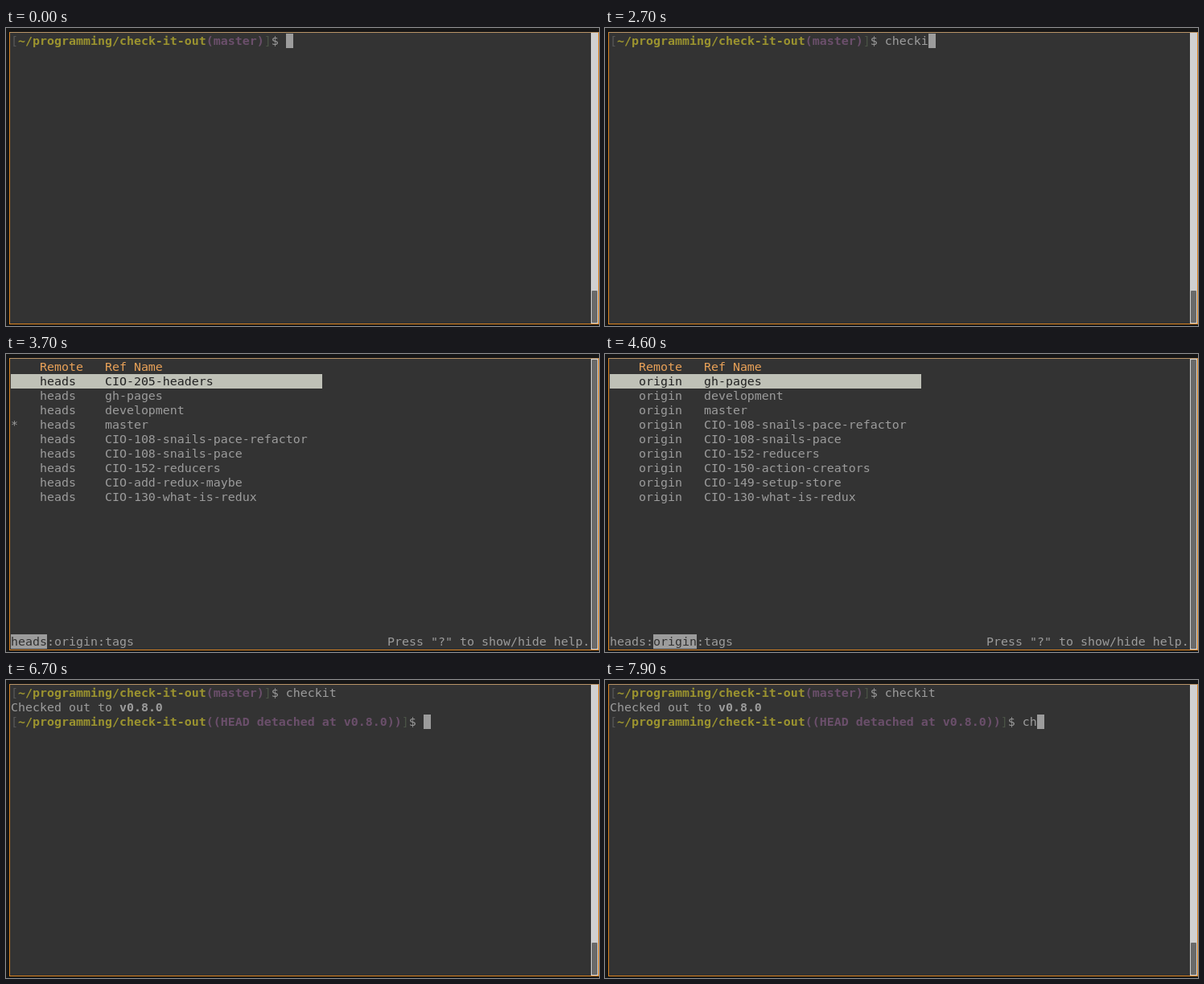
Write an HTML page that moves like this. It is 737 px wide and 371 px high and loops after 8 s.

```html
<!DOCTYPE html>
<html lang="en">
<head>
<meta charset="utf-8">
<title>Terminal: checkit</title>
<style>
  html, body { margin: 0; width: 100%; height: 100%; overflow: hidden; background: #161616; }
  #stage { position: relative; width: 737px; height: 371px; overflow: hidden; }
  #stage * { box-sizing: border-box; }
  #window {
    position: absolute; left: 4px; top: 5px; width: 733px; height: 364px;
    background: #333; border: 1px solid #de8420; border-top-color: #b89468;
  }
  #bar { position: absolute; left: 727px; top: 6px; width: 9px; height: 362px; background: #d0d0d0; }
  #thumb {
    position: absolute; left: 0; bottom: 0; width: 9px; height: 42px;
    background: #696969; border: 1px solid #d0d0d0; border-radius: 2px;
    animation: thumb 8s step-end infinite;
  }
  #term {
    position: absolute; left: 6px; top: 7px; width: 720px; height: 360px;
    font: 14.95px/18px "DejaVu Sans Mono", monospace; color: #9c9c9c;
  }
  pre, .view { position: absolute; left: 0; top: 0; margin: 0; font: inherit; white-space: pre; }
  .view { width: 720px; height: 360px; }
  b { font-weight: bold; }
  .path { color: #9b932f; }
  .branch { color: #6b4f6b; }
  .open { color: #575757; }
  .close { color: #4b5446; }
  .typed { display: inline-block; height: 18px; vertical-align: top; overflow: hidden; width: 0; }
  .head { color: #e8a158; }
  .pick { display: inline-block; height: 18px; vertical-align: top; background: #bfc1b7; color: #222; }
  .status { top: 342px; }
  .tab { display: inline-block; height: 18px; vertical-align: top; background: #9c9c9c; color: #303030; }
  .help { top: 342px; left: 468px; }
  #cursor {
    position: absolute; width: 9px; height: 18px; background: #9c9c9c;
    animation: cursor 8s step-end infinite;
  }
  #first { animation: first 8s step-end infinite; }
  #after { top: 18px; animation: after 8s step-end infinite; }
  #cmd { animation: cmd 8s step-end infinite; }
  #next { animation: next 8s step-end infinite; }
  #heads { animation: heads 8s step-end infinite; }
  #origin { animation: origin 8s step-end infinite; }
  #tags { animation: tags 8s step-end infinite; }

  @keyframes thumb { 0%, 83.75%, 100% { height: 42px; } 45% { height: 362px; } }
  @keyframes first { 0%, 83.75%, 100% { visibility: visible; } 45% { visibility: hidden; } }
  @keyframes after { 0% { visibility: hidden; } 83.75%, 100% { visibility: visible; } }
  @keyframes heads { 0%, 57.5%, 100% { visibility: hidden; } 46.25% { visibility: visible; } }
  @keyframes origin { 0%, 68.75%, 100% { visibility: hidden; } 57.5% { visibility: visible; } }
  @keyframes tags { 0%, 83.75%, 100% { visibility: hidden; } 68.75% { visibility: visible; } }
  @keyframes cmd {
    0% { width: 0; } 17.5% { width: 9px; } 21.25% { width: 18px; } 23.75% { width: 27px; }
    27.5% { width: 36px; } 30% { width: 45px; } 33.75% { width: 54px; } 36.25%, 100% { width: 63px; }
  }
  @keyframes next { 0% { width: 0; } 95% { width: 9px; } 98.75%, 100% { width: 18px; } }
  @keyframes cursor {
    0% { transform: translate(342px, 0); visibility: visible; }
    6.25% { transform: translate(342px, 0); visibility: hidden; }
    13.75% { transform: translate(342px, 0); visibility: visible; }
    17.5% { transform: translate(351px, 0); visibility: visible; }
    21.25% { transform: translate(360px, 0); visibility: visible; }
    23.75% { transform: translate(369px, 0); visibility: visible; }
    27.5% { transform: translate(378px, 0); visibility: visible; }
    30% { transform: translate(387px, 0); visibility: visible; }
    33.75% { transform: translate(396px, 0); visibility: visible; }
    36.25% { transform: translate(405px, 0); visibility: visible; }
    43.75% { transform: translate(0, 18px); visibility: visible; }
    45% { transform: translate(0, 0); visibility: hidden; }
    83.75% { transform: translate(513px, 36px); visibility: visible; }
    91.25% { transform: translate(513px, 36px); visibility: hidden; }
    95% { transform: translate(522px, 36px); visibility: visible; }
    98.75%, 100% { transform: translate(531px, 36px); visibility: visible; }
  }
</style>
</head>
<body>
<div id="stage">
  <div id="window"></div>
  <div id="bar"><div id="thumb"></div></div>
  <div id="term">
    <pre id="first"><span class="open">[</span><b class="path">~/programming/check-it-out</b><b class="branch">(master)</b><span class="close">]</span>$ <span class="typed" id="cmd">checkit</span></pre>
    <pre id="after">Checked out to <b>v0.8.0</b>
<span class="open">[</span><b class="path">~/programming/check-it-out</b><b class="branch">((HEAD detached at v0.8.0))</b><span class="close">]</span>$ <span class="typed" id="next">ch</span></pre>

    <div class="view" id="heads">
      <pre><span class="head">    Remote   Ref Name</span>
<span class="pick" style="width: 387px">    heads    CIO-205-headers</span>
    heads    gh-pages
    heads    development
*   heads    master
    heads    CIO-108-snails-pace-refactor
    heads    CIO-108-snails-pace
    heads    CIO-152-reducers
    heads    CIO-add-redux-maybe
    heads    CIO-130-what-is-redux</pre>
      <pre class="status"><span class="tab">heads</span>:origin:tags</pre>
      <pre class="help">Press "?" to show/hide help.</pre>
    </div>

    <div class="view" id="origin">
      <pre><span class="head">    Remote   Ref Name</span>
<span class="pick" style="width: 387px">    origin   gh-pages</span>
    origin   development
    origin   master
    origin   CIO-108-snails-pace-refactor
    origin   CIO-108-snails-pace
    origin   CIO-152-reducers
    origin   CIO-150-action-creators
    origin   CIO-149-setup-store
    origin   CIO-130-what-is-redux</pre>
      <pre class="status">heads:<span class="tab">origin</span>:tags</pre>
      <pre class="help">Press "?" to show/hide help.</pre>
    </div>

    <div class="view" id="tags">
      <pre><span class="head">    Remote   Ref Name</span>
<span class="pick" style="width: 207px">    tags     v0.8.0</span>
    tags     v0.7.9
    tags     v0.7.8
    tags     v0.7.7
    tags     v0.7.6
    tags     v0.7.5
    tags     v0.7.4
    tags     v0.7.3
    tags     v0.7.2
    tags     v0.7.11
    tags     v0.7.10
    tags     v0.7.1
    tags     v0.7.0
    tags     v0.6.1
    tags     v0.6.0
    tags     v0.5.0
    tags     v0.4.1
    tags     v0.4.0</pre>
      <pre class="status">heads:origin:<span class="tab">tags</span></pre>
      <pre class="help">Press "?" to show/hide help.</pre>
    </div>
    <div id="cursor"></div>
  </div>
</div>
</body>
</html>
```
